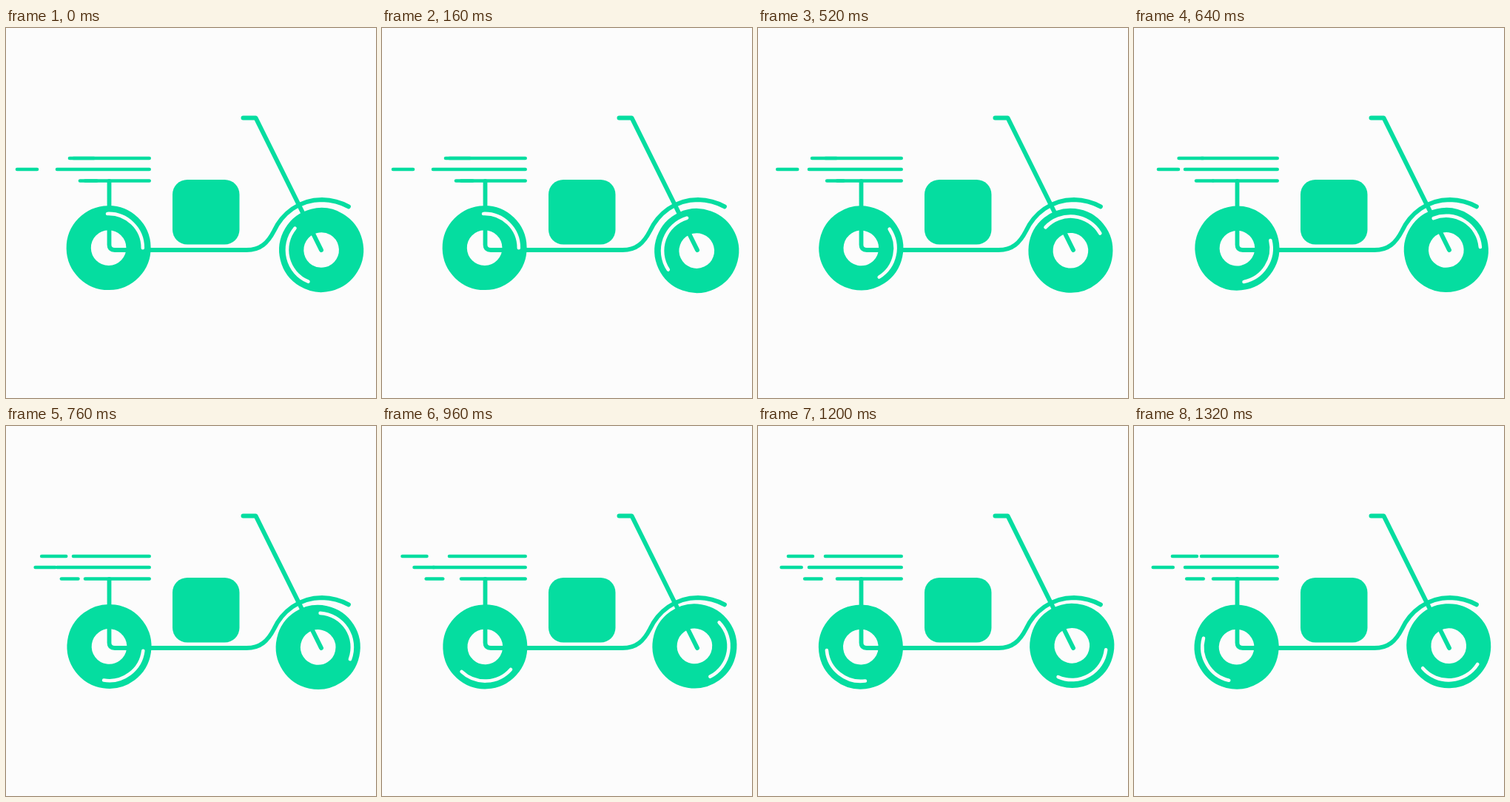
An HTML page that plays this animation: 500 px wide and 500 px high, repeating every 1.36 s.

```html
<!DOCTYPE html>
<html lang="en">
<head>
<meta charset="utf-8">
<title>Scooter</title>
<style>
  html, body { margin: 0; width: 100%; height: 100%; overflow: hidden; background: #fcfcfc; }
  svg { display: block; width: 100%; height: 100%; }
  path, circle { fill: none; stroke: #05dda0; stroke-linecap: round; stroke-linejoin: round; }
  .speed { stroke-width: 4.6; }
  .tire { stroke-width: 33.2; }
  .shine { stroke: #fcfcfc; stroke-width: 4.6; }
</style>
</head>
<body>
<svg viewBox="0 0 500 500">
  <g class="speed">
    <path d="M91 176H193.700M69 191H193.700M107 206.500H193.700"/>
    <path id="top"/>
    <path id="middle"/>
    <path id="bottom"/>
  </g>
  <rect x="225" y="205" width="90.5" height="87.5" rx="20" fill="#05dda0"/>
  <path stroke-width="5.8" d="M139.500 207V293Q139.500 300 147 300H325C344 300 354 290 362 274.500C373 251 396 232 427 232Q447 232.500 463 241.400"/>
  <path stroke-width="6" d="M320.500 121.500H337.500L426 300"/>
  <g id="rear">
    <circle class="tire" cx=".5" cy="-.6" r="40.4"/>
    <circle class="shine" cx=".5" cy="-.6" r="46.2" pathLength="360" stroke-dasharray="92 268" stroke-dashoffset="46"/>
  </g>
  <g id="front">
    <circle class="tire" cx="-1.84" cy="-1.38" r="40.4"/>
    <circle class="shine" cx="-1.84" cy="-1.38" r="46.2" pathLength="360" stroke-dasharray="107 253" stroke-dashoffset="53.5"/>
  </g>
</svg>
<script>
const LOOP = 1360, STEP = 40;
const RETURN_RATE = 0.88; // dashes travel back slightly slower

const since = (t, delay) => Math.max(0, t - delay);

// Distance covered by a dash that waits, runs out at a steady speed, then turns back.
function swing(t, delay, turn, speed) {
  const out = Math.min(since(t, delay), turn - delay);
  return speed * (out - RETURN_RATE * since(t, turn));
}

function setDash(id, x, y, length) {
  document.getElementById(id).setAttribute('d', `M${x} ${y}h${length}`);
}

// The tires sit off their pivots, so turning them also makes them wobble.
function setWheel(id, x, y, angle) {
  document.getElementById(id).setAttribute('transform', `translate(${x} ${y}) rotate(${angle})`);
}

const start = performance.now();

function draw() {
  const elapsed = (performance.now() - start) % LOOP;
  const t = Math.floor(elapsed / STEP) * STEP;

  setDash('top', 86 - swing(t, 395, 1003, 0.1036), 176, 33);
  setDash('middle', 15 + swing(t, 320, 890, 0.0561), 191, 27);
  setDash('bottom', 100 - swing(t, 430, 1048, 0.076), 206.5, 22.5);

  setWheel('rear', 138.7, 297.9, -46 + 0.171 * since(t, 180));
  setWheel('front', 424, 299.1, 166 + 0.212 * t);

  requestAnimationFrame(draw);
}
draw();
</script>
</body>
</html>
```
